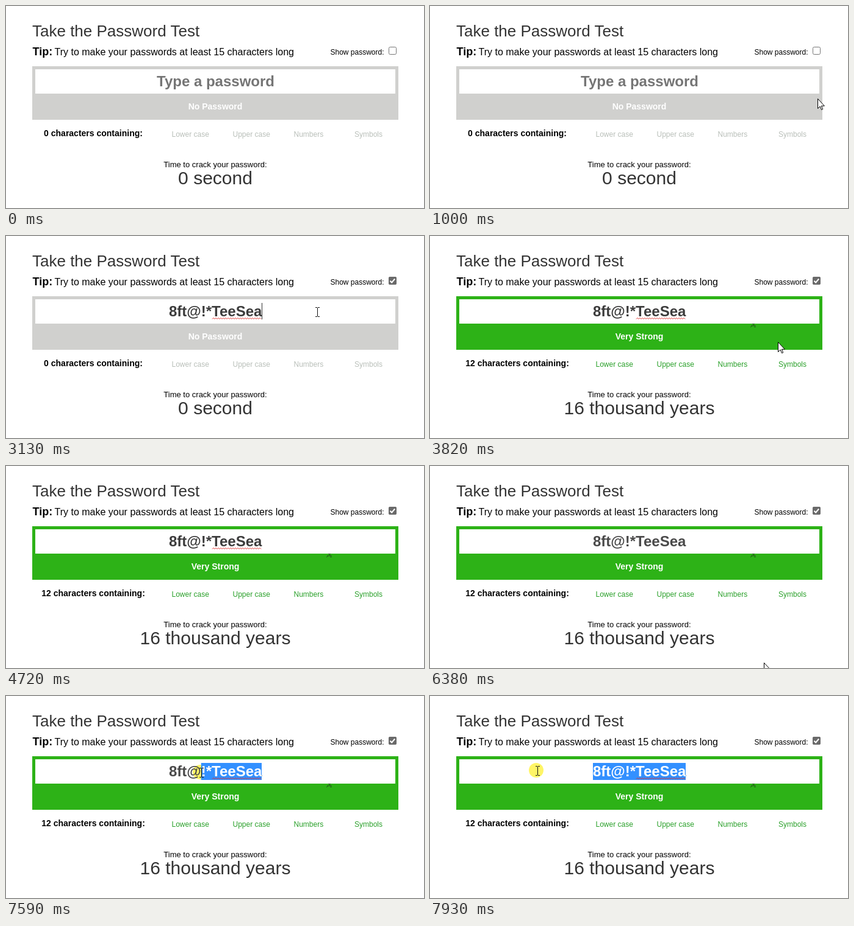
An HTML page that plays this animation: 685 by 332 pixels, repeating every 8000 ms.

```html
<!DOCTYPE html>
<html lang="en">
<head>
<meta charset="utf-8">
<title>Password test</title>
<style>
html, body { margin: 0; width: 100%; height: 100%; overflow: hidden; background: #fff; }
svg { display: block; width: 685px; height: 332px; font-family: "Liberation Sans", Arial, sans-serif; }
.b { font-weight: bold; }
.mid { text-anchor: middle; }
.s12 { font-size: 12px; }
.s14 { font-size: 14px; }
.s24 { font-size: 24px; }
.s30 { font-size: 30px; }
</style>
</head>
<body>
<svg viewBox="0 0 685 332">
  <defs><clipPath id="clip"><rect id="clipBox" y="110" height="28"/></clipPath></defs>

  <text x="43" y="50" font-size="26" fill="#333">Take the Password Test</text>
  <text x="43.5" y="81" font-size="18" class="b">Tip:</text>
  <text x="79.5" y="81" font-size="16">Try to make your passwords at least 15 characters long</text>
  <text x="531.5" y="80" class="s12">Show password:</text>
  <rect x="627.5" y="67.5" width="12" height="12" rx="2" fill="#fff" stroke="#767676"/>
  <g id="check">
    <rect x="627" y="67" width="13" height="13" rx="2" fill="#6a6a6a"/>
    <path d="M629.5 73.7l2.7 2.8 5-6" fill="none" stroke="#fff" stroke-width="2"/>
  </g>

  <rect id="bar" x="43" y="99" width="600" height="88"/>
  <rect x="48" y="104" width="590" height="40" fill="#fff"/>
  <text id="strength" x="343" y="170" class="b mid s14" fill="#fff"></text>
  <text id="count" x="143" y="214" class="b mid s14"></text>
  <g id="kinds" class="s12">
    <text x="271.5" y="215">Lower case</text>
    <text x="371.5" y="215">Upper case</text>
    <text x="471.5" y="215">Numbers</text>
    <text x="571" y="215">Symbols</text>
  </g>
  <text x="343" y="265" font-size="13" class="mid">Time to crack your password:</text>
  <text id="crack" x="343" y="293" class="mid s30" fill="#333"></text>

  <path id="specks" d="M528 144.5h4M529.5 144l2 4M526 147.5h8M525 150l4-3M531 149.5h3" fill="none" stroke="#1d3a18" opacity=".7"/>

  <text id="hint" x="343.5" y="132" class="b mid s24" fill="#757575">Type a password</text>
  <circle id="press" r="12" fill="#fff566"/>
  <g id="entry" class="b s24">
    <text id="pass" x="267" y="132">8ft@!*TeeSea</text>
    <rect id="sel" y="110" height="28" fill="#3390ff"/>
    <text x="267" y="132" fill="#fff" clip-path="url(#clip)">8ft@!*TeeSea</text>
    <path id="wave" fill="none" stroke="#e0302c"/>
  </g>
  <rect id="caret" y="110" width="1" height="27" fill="#333"/>

  <g id="cursor">
    <path id="arrow" d="M.5.5V16.5L4.2 13 6.6 18.5 8.7 17.6 6.4 12.2H11.4Z" fill="#fff" stroke="#000"/>
    <path id="beam" d="M.5-7V7M-3-7.5H0M1-7.5H4M-3 7.5H0M1 7.5H4" fill="none" stroke="#111"/>
  </g>
</svg>
<script>
const LOOP = 8000, STEP = 68, BLINK = 530;
const PASTE = 3070, RATED = 3270, BLUR = 6040, DRAG = 7250;
const END = 419; // right edge of the typed text

const $ = id => document.getElementById(id);
const show = (id, on) => { $(id).style.display = on ? "" : "none"; };
const put = (id, attrs) => { for (const k in attrs) $(id).setAttribute(k, attrs[k]); };

const linear = k => k;
const smooth = k => k * k * (3 - 2 * k);

// pointer strokes: curves from one point to another, pulled towards "via"
const STROKES = [
  { t0: 530, t1: 1270, from: [649, 318], via: [628, 130], to: [637, 78], ease: linear },
  { t0: 1670, t1: 2070, from: [637, 78], via: [604, 66], to: [510, 125], ease: linear },
  { t0: RATED, t1: 4030, from: [510, 125], via: [540, 78], to: [603, 258], ease: linear },
  { t0: 4100, t1: 4450, from: [603, 258], via: [615, 300], to: [628, 336], ease: linear },
  { t0: 6380, t1: 6910, from: [547, 323], via: [475, 183], to: [463, 130], ease: linear },
  { t0: DRAG, t1: 7930, from: [463, 130], via: [320, 126], to: [176, 123], ease: smooth }
];

function pointer(t) {
  const m = STROKES.filter(s => s.t0 <= t).pop() || STROKES[0];
  const done = Math.floor(Math.max(0, t - m.t0) / STEP) * STEP;
  const k = m.ease(t >= m.t1 ? 1 : done / (m.t1 - m.t0));
  const q = 1 - k;
  return [0, 1].map(i => Math.round(q * q * m.from[i] + 2 * q * k * m.via[i] + k * k * m.to[i]));
}

const mix = (from, to, k) => `rgb(${from.map((v, i) => Math.round(v + (to[i] - v) * k))})`;

const pass = $("pass");
const edges = [...pass.textContent].map((c, i) => pass.getStartPositionOfChar(i).x).concat(END);

// character edge closest to the pointer
function nearestEdge(x) {
  return edges.reduce((best, e) => Math.abs(e - x) < Math.abs(best - x) ? e : best);
}

put("wave", { d: "M338 136.5" + "l2-2l2 2".repeat(20) });

function draw(t) {
  const [x, y] = pointer(t);
  const inField = y >= 104 && y <= 146 && x < 638;
  const pasted = t >= PASTE, rated = t >= RATED, dragging = t >= DRAG;

  show("cursor", t >= STROKES[0].t0);
  put("cursor", { transform: `translate(${x} ${y})` });
  show("arrow", !inField);
  show("beam", inField);
  show("press", dragging || (t >= 2340 && t < 2470));
  put("press", { cx: x - 2, cy: y - 1 });

  show("check", t >= 1410);
  show("hint", !pasted);
  show("entry", pasted);
  show("wave", t < BLUR || t >= DRAG + STEP);
  put("pass", { fill: t < BLUR ? "#3c3c3c" : "#4a4a4a" });

  const left = dragging ? nearestEdge(x) : END;
  for (const id of ["sel", "clipBox"]) put(id, { x: left, width: END - left });

  const focus = pasted ? PASTE + 60 : 2400;
  show("caret", t >= focus && t < BLUR && Math.floor((t - focus) / BLINK) % 2 === 0);
  put("caret", { x: pasted ? END : 343 });

  const k = rated ? Math.min(1, (Math.floor((t - RATED) / STEP) + 1) / 6) : 0;
  put("bar", { fill: mix([208, 208, 206], [45, 178, 23], k) });
  put("kinds", { fill: mix([185, 191, 185], [42, 160, 42], k) });
  $("strength").textContent = rated ? "Very Strong" : "No Password";
  $("count").textContent = `${rated ? 12 : 0} characters containing:`;
  $("crack").textContent = rated ? "16 thousand years" : "0 second";
  show("specks", t >= 3726);
}

const start = performance.now();
function tick() {
  draw((performance.now() - start) % LOOP);
  requestAnimationFrame(tick);
}
tick();
</script>
</body>
</html>
```
